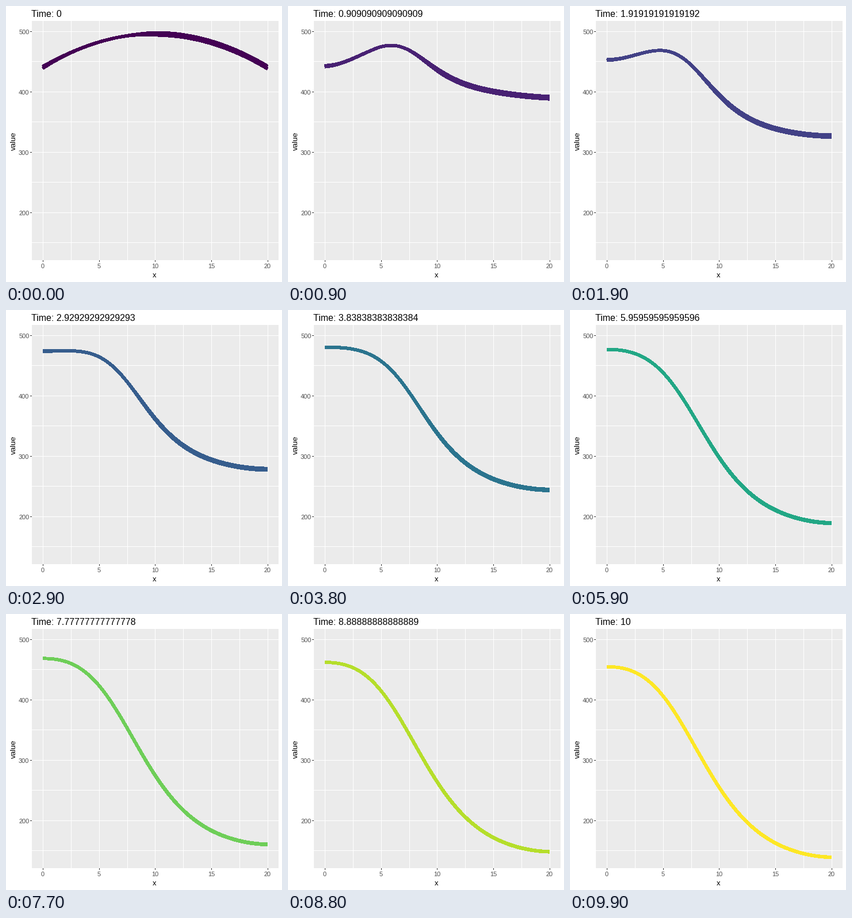
A matplotlib script for the animation above (10 s loop, 480 by 480 pixels).

```python
import numpy as np
import matplotlib.pyplot as plt
from matplotlib.animation import FuncAnimation
from matplotlib.patches import Rectangle

FRAMES = 100
PX = 0.9  # points per pixel at 80 dpi

plt.rcParams["font.family"] = "Liberation Sans"

xs = np.linspace(0, 20, 101)


def profile(t):
    """Arch that settles into an S-curve from a warm left to a cooling right."""
    arch = 441 + 0.555 * xs * (20 - xs)
    warm = 490 - 0.35 * t ** 2
    cool = 111 + 332 * np.exp(0.05 * (1 - np.exp(-2 * t)) - t / 4)

    # share of the warm level, flat at both ends
    late = 1.57 * np.exp(-t / 3 - (xs / 9) ** 3)
    k = (1.78 - 0.0082 * (xs - 8) ** 2) * np.maximum(1 - late, 0)
    share = (20 - xs) ** 2 / ((20 - xs) ** 2 + k * xs ** 2)

    # cold spot at the left edge that fades out
    dip = 47 / (1 + (t / 2.4) ** 5) * np.exp(-(xs / 4.7) ** 2)

    settled = cool + (warm - cool) * share - dip
    start = np.exp(-t / 0.35)
    return start * arch + (1 - start) * settled


def spread(t):
    """Half height in pixels of the band around the profile."""
    s = np.clip((xs - 7) / 4, 0, 1)
    right = min(2.6, 3.7 * np.exp(-t / 4)) * s * s * (3 - 2 * s)
    left = 1.8 * np.exp(-xs / 1.5 - t / 2.5)
    return left + right


def px_x(x):
    return 64.05 + 19.53 * x


def px_y(v):
    return 44.5 + (500 - v) * 1.05


fig = plt.figure(figsize=(6, 6), dpi=80, facecolor="white")
ax = fig.add_axes([0, 0, 1, 1])
ax.set_xlim(0, 480)
ax.set_ylim(480, 0)
ax.axis("off")


def box(x, y, w, h, color):
    ax.add_patch(Rectangle((x, y), w, h, fc=color, lw=0, aa=False, zorder=1))


def label(x, y, text, size, color="black", **kw):
    return ax.text(x, y, text, fontsize=size * PX, color=color,
                   va="baseline", **kw)


box(45, 26, 429, 416, "#EBEBEB")
for v in range(150, 501, 50):
    row = int(px_y(v) - 0.3)
    box(45, row, 429, 1, "white")
    if v % 100 == 0:
        box(42, row, 3, 1, "#333333")
        label(40.5, row + 5, str(v), 11, "#4D4D4D", ha="right")
for x in np.arange(0, 20.1, 2.5):
    col = round(px_x(x))
    box(col, 26, 1, 416, "white")
    if x % 5 == 0:
        box(col, 442, 1, 3, "#333333")
        label(col, 456, f"{x:g}", 11, "#4D4D4D", ha="center")

label(258.5, 472, "x", 13, ha="center")
label(17, 234.5, "value", 13.5, ha="center", rotation=90,
      rotation_mode="anchor")
title = label(44.5, 19, "", 16)

edges = [ax.plot([], [], lw=4.8 * PX, aa=False, solid_capstyle="butt",
                 solid_joinstyle="round", zorder=3)[0] for _ in range(2)]
band = ax.fill([0, 0, 0], [0, 0, 0], lw=0, aa=False, zorder=3)[0]


def update(i):
    t = i * 10 / (FRAMES - 1)
    color = plt.cm.viridis(t / 10)
    mid, half, px = px_y(profile(t)), spread(t), px_x(xs)
    top, bottom = mid - 0.7 * half, mid + half
    for line, y in zip(edges, (top, bottom)):
        line.set_data(px, y)
        line.set_color(color)
    band.set_xy(np.column_stack([np.r_[px, px[::-1]],
                                 np.r_[top, bottom[::-1]]]))
    band.set_facecolor(color)
    title.set_text(f"Time: {t:.15g}")
    return [*edges, band, title]


anim = FuncAnimation(fig, update, frames=FRAMES, interval=100,
                     repeat=True, repeat_delay=0, blit=False)
plt.show()
```
